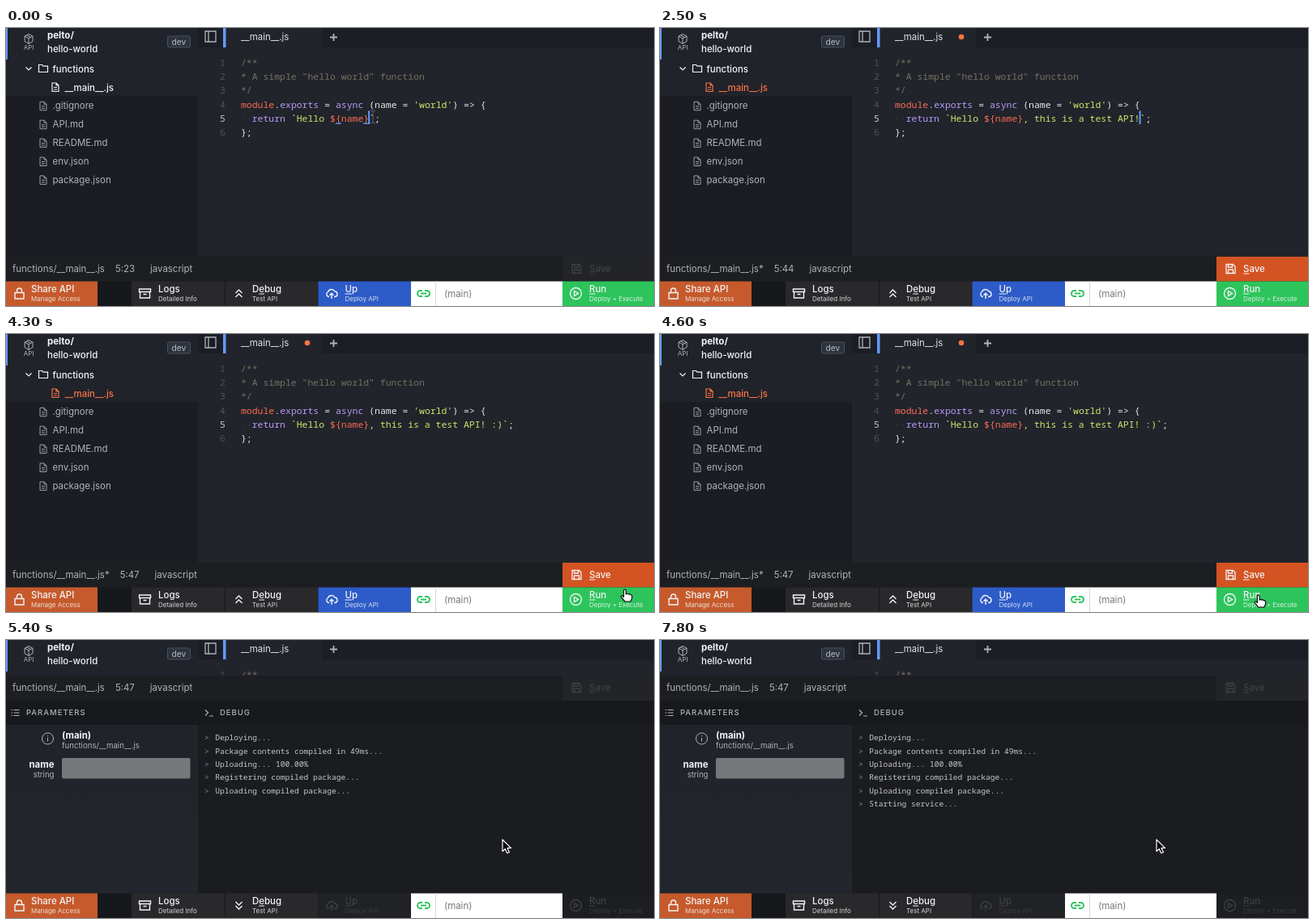
Write an HTML page with a canvas that moves like this. It is 800 px wide and 344 px high and loops after 8 s.

```html
<!DOCTYPE html>
<html lang="en">
<head>
<meta charset="utf-8">
<style>
  html, body { margin: 0; width: 100%; height: 100%; overflow: hidden; background: #1b1d22; }
  canvas { display: block; width: 800px; height: 344px; }
</style>
</head>
<body>
<canvas id="stage" width="800" height="344"></canvas>
<script>
const ctx = document.getElementById('stage').getContext('2d');
const LOOP = 8000, OPEN = 4700, LAST_KEY = 2800, MARK_FILE = 2200;
const UI = 'Inter, sans-serif', MONO = '"Noto Sans Mono", monospace';
const CODE_X = 290, CODE_SIZE = 11.46, ADVANCE = CODE_SIZE * 0.6, LINE = 17.15;
const FOOT = 313.5;
const ORANGE = '#fa7343', WHITE = '#f3f4f6', GREY = '#b0b3b9', BLUE = '#6699ff', OFF = '#3e4044';
const RED = '#ff6b55', PURPLE = '#b99af8', GREEN = '#cde86c', COMMENT = '#777162', PLAIN = '#e6e7ea';
const TYPED = ', this is a test API! :)';

const LOG = [
  [4700, 'Deploying...'],
  [4800, 'Package contents compiled in 49ms...'],
  [4950, 'Uploading... 100.00%'],
  [5100, 'Registering compiled package...'],
  [5400, 'Uploading compiled package...'],
  [6400, 'Starting service...'],
];

// time, x, y of the pointer tip
const POINTER = [[3800, 453, 110], [4250, 764, 316], [4400, 764, 316], [4650, 736, 324],
                 [4850, 736, 324], [5200, 613, 247]];

const ICON = {
  cube: 'M0-6L5-3.3V3L0 6L-5 3V-3.3ZM-5-3.3L0-.6L5-3.3M0-.6V6M-2.5-4.7L2.5-2',
  chevron: 'M-3.5-1.5L0 2L3.5-1.5',
  folder: 'M-5.5 4.5V-4.5H-1.5L0-2.8H5.5V4.5Z',
  file: 'M-4-5H1L4-2V5.5H-4ZM1-5V-2H4M-2 .5H2M-2 3H2',
  panel: 'M-6.5-6.5H6.5V6.5H-6.5ZM-2.5-6.5V6.5',
  lock: 'M-5.5-1H5.5V6.5H-5.5ZM-3-1V-3.5A3 3 0 0 1 3-3.5V-1',
  box: 'M-7-5.5H7V-2H-7ZM-6-2V5.5H6V-2M-2 1H2',
  up: 'M-4-.5L0-4.5L4-.5M-4 4.5L0 .5L4 4.5',
  down: 'M-4-4.5L0-.5L4-4.5M-4 .5L0 4.5L4 .5',
  cloud: 'M-3 4H-4A3.3 3.3 0 0 1-4.5-2A4.7 4.7 0 0 1 4-2.5A3.3 3.3 0 0 1 4.5 4H3M0 6.5V0M-2.5 2.3L0-.2L2.5 2.3',
  link: 'M-1.5-3.5H-4A3.5 3.5 0 0 0-4 3.5H-1.5M1.5-3.5H4A3.5 3.5 0 0 1 4 3.5H1.5M-3.5 0H3.5',
  save: 'M-5.5-5.5H3L5.5-3V5.5H-5.5ZM-3-5.5V-2H2V-5.5M-3 5.5V1H3V5.5',
  play: 'M-7 0A7 7 0 1 1 7 0A7 7 0 1 1-7 0M-2-3L3 0L-2 3Z',
  info: 'M-7 0A7 7 0 1 1 7 0A7 7 0 1 1-7 0M0-1V3.5M0-3.8V-2.6',
  list: 'M-5-3.5H-3.5M-2-3.5H5M-5 0H-3.5M-2 0H5M-5 3.5H-3.5M-2 3.5H5',
  prompt: 'M-5-3.5L-1.5 0L-5 3.5M0 4H5',
  plus: 'M-4.5 0H4.5M0-4.5V4.5',
};
const ARROW = 'M0 0V14.5L3.4 11.4L5.7 16.7L8.3 15.6L6 10.4H10.5Z';
const HAND = 'M-1.4 1Q0-1 1.4 1V6Q3 4.5 4.2 6Q5.6 5 6.7 6.7Q8.4 6 8.8 8V11L7 15H0L-4.5 9.5Q-5 7.3-2.8 8L-1.4 9.5Z';
const IBEAM = 'M-3-8Q0-8 0-6Q0-8 3-8M0-6V6M-3 8Q0 8 0 6Q0 8 3 8';

function rect(x, y, w, h, color) {
  ctx.fillStyle = color;
  ctx.fillRect(x, y, w, h);
}

// y is the middle of the capitals; returns the width
function text(str, x, y, color = WHITE, size = 11.45, weight = 400, family = UI) {
  ctx.font = `${weight} ${size}px ${family}`;
  ctx.fillStyle = color;
  ctx.fillText(str, x, y + size * 0.36);
  return ctx.measureText(str).width;
}

function icon(name, x, y, color = GREY, width = 1.2) {
  ctx.save();
  ctx.translate(x, y);
  ctx.strokeStyle = color;
  ctx.lineWidth = width;
  ctx.stroke(new Path2D(ICON[name]));
  ctx.restore();
}

function code(row, parts) {
  let col = 0;
  for (const [str, color] of parts) {
    text(str, CODE_X + col * ADVANCE, 43 + row * LINE, color, CODE_SIZE, 500, MONO);
    col += str.length;
  }
}

// Button label with one underlined access key
function label(str, key, x, y, color) {
  text(str, x, y, color, 11.45, 500);
  if (key < 0) return;
  const start = ctx.measureText(str.slice(0, key)).width;
  rect(x + start, y + 5.5, ctx.measureText(str[key]).width, 1, color);
}

function button(x, w, bg, glyph, title, key, sub, color = WHITE) {
  rect(x, FOOT, w, 31, bg);
  icon(glyph, x + 16.5, 328.5, color, 1.4);
  const left = x + (x ? 33 : 31);
  label(title, key, left, 323, color);
  ctx.globalAlpha = 0.85;
  text(sub, left, 335, color, 8);
  ctx.globalAlpha = 1;
}

function sidebar(t) {
  rect(0, 0, 237, 344, '#1b1d22');
  rect(0, 0, 237, 84, '#20232a');
  rect(0, 0, 2, 39, BLUE);
  icon('cube', 28, 13.5, GREY, 1);
  text('API', 21.8, 24, GREY, 8);
  text('pelto/', 51, 8.5, WHITE, 11.45, 700);
  text('hello-world', 51, 25.7, WHITE, 11.45, 500);
  ctx.beginPath();
  ctx.roundRect(199.5, 10, 28, 14, 2);
  ctx.fillStyle = '#2d333d';
  ctx.fill();
  ctx.strokeStyle = '#4a515d';
  ctx.lineWidth = 1;
  ctx.stroke();
  text('dev', 204.5, 17, '#b5bac3', 10.2);

  icon('chevron', 28, 50, WHITE);
  icon('folder', 46, 50, WHITE);
  text('functions', 57.5, 50.4, WHITE, 11.45, 500);
  const mainColor = t >= MARK_FILE ? ORANGE : WHITE;
  icon('file', 61, 73, mainColor);
  text('__main__.js', 72.5, 73.4, mainColor, 11.45, 500);
  ['.gitignore', 'API.md', 'README.md', 'env.json', 'package.json'].forEach((name, i) => {
    const y = 96.3 + i * 22.9;
    icon('file', 46, y, '#9b9ea5', 1);
    text(name, 57.5, y, GREY);
  });
}

function editor(t, typed, dirty) {
  rect(237, 0, 563, 283, '#21242b');
  rect(237, 0, 563, 24, '#1b1e24');
  rect(268, 0, 122, 24, '#21242b');
  rect(268, 0, 3.5, 24, BLUE);
  icon('panel', 252.5, 10.5, GREY, 1.3);
  text('__main__.js', 290, 10.6, '#e2e4e8');
  icon('plus', 404.5, 11.5, GREY, 1.8);
  if (dirty) {
    ctx.beginPath();
    ctx.arc(372, 11, 3.3, 0, 7);
    ctx.fillStyle = ORANGE;
    ctx.fill();
  }
  for (let i = 0; i < 6; i++)
    text(i + 1, 264, 43 + i * LINE, i === 4 ? '#c9ccd2' : '#4d525c', CODE_SIZE, 400, MONO);

  code(0, [['/**', COMMENT]]);
  code(1, [['* A simple "hello world" function', COMMENT]]);
  code(2, [['*/', COMMENT]]);
  code(3, [['module', RED], ['.', PLAIN], ['exports', PURPLE], [' = ', PLAIN], ['async', PURPLE],
           [' (name = ', PLAIN], ["'world'", GREEN], [') => {', PLAIN]]);
  code(4, [['··', '#3d414a'], ['return', PURPLE], [' `Hello ', GREEN], ['${name}', RED],
           [TYPED.slice(0, typed) + '`', GREEN], [';', PLAIN]]);
  code(5, [['};', PLAIN]]);

  if (!typed)
    for (const col of [17, 22]) rect(CODE_X + col * ADVANCE, 117.5, ADVANCE, 1.3, BLUE);
  if (t < LAST_KEY || (t - LAST_KEY) % 1000 < 500)
    rect(CODE_X + (23 + typed) * ADVANCE - 1, 102.5, 2, 16.5, BLUE);
}

function statusBar(y, typed, dirty) {
  rect(0, y, 800, 31, '#1c1e22');
  let x = 8;
  x += text('functions/__main__.js' + (dirty ? '*' : ''), x, y + 15, GREY) + 13;
  x += text('5:' + (23 + typed), x, y + 15, GREY) + 19;
  text('javascript', x, y + 15, GREY);
  rect(687, y, 113, 31, dirty ? '#d45322' : '#232428');
  icon('save', 704.5, y + 15, dirty ? WHITE : OFF, 1.3);
  label('Save', 0, 720, y + 15, dirty ? WHITE : OFF);
}

function debugPanel(t) {
  const side = ctx.createLinearGradient(0, 105, 0, 313);
  side.addColorStop(0, '#20242a');
  side.addColorStop(1, '#23262d');
  rect(0, 75, 237, 239, side);
  rect(237, 75, 563, 239, '#1b1c20');
  rect(0, 75, 800, 30, '#18191d');
  ctx.letterSpacing = '1px';
  text('PARAMETERS', 25, 90, GREY, 9.5, 500);
  text('DEBUG', 264, 90, GREY, 9.5, 500);
  ctx.letterSpacing = '0px';
  icon('list', 11.5, 90);
  icon('prompt', 251, 90);

  icon('info', 51.5, 122, GREY, 1);
  text('(main)', 69, 117.5, WHITE, 11.45, 700);
  text('functions/__main__.js', 69, 130.5, GREY, 9.65);
  ctx.textAlign = 'right';
  text('name', 59.5, 154, WHITE, 11.45, 700);
  text('string', 59.5, 167, GREY, 9.65);
  ctx.textAlign = 'left';
  ctx.beginPath();
  ctx.roundRect(69, 146, 158.5, 25.5, 2);
  ctx.fillStyle = '#767779';
  ctx.fill();

  LOG.forEach(([start, line], i) => {
    if (t < start) return;
    const y = 121 + i * 16.3;
    text('>', 245, y, '#85888e', 9.58, 400, MONO);
    text(line, 258.3, y, '#c6c8cc', 9.58, 400, MONO);
  });
}

function footer(open) {
  rect(0, FOOT, 800, 31, '#17181c');
  button(0, 113, '#c65a2c', 'lock', 'Share API', -1, 'Manage Access');
  button(155, 115, '#29292b', 'box', 'Logs', -1, 'Detailed Info');
  button(271, 114, '#29292b', open ? 'down' : 'up', 'Debug', 1, 'Test API');
  button(385.5, 114.5, open ? '#212226' : '#2d5bc8', 'cloud', 'Up', 0, 'Deploy API', open ? OFF : WHITE);
  rect(500, FOOT, 187, 31, '#ffffff');
  rect(530, FOOT, 1, 31, '#d9d9d9');
  icon('link', 515.5, 328.5, '#2dc45c', 1.9);
  text('(main)', 541, 329, '#777777');
  button(687, 113, open ? '#1d1e22' : '#2dc45c', 'play', 'Run', 0, 'Deploy + Execute', open ? OFF : WHITE);
}

function pointerAt(t) {
  const i = POINTER.findIndex(p => p[0] > t);
  if (i === 0) return POINTER[0].slice(1);
  if (i < 0) return POINTER.at(-1).slice(1);
  const [t0, x0, y0] = POINTER[i - 1], [t1, x1, y1] = POINTER[i];
  const u = (t - t0) / (t1 - t0), ease = u * u * (3 - 2 * u);
  return [x0 + (x1 - x0) * ease, y0 + (y1 - y0) * ease];
}

function pointer(t, open) {
  if (t >= 100 && t < POINTER[0][0]) return;
  const [x, y] = pointerAt(t);
  ctx.save();
  ctx.translate(x, y);
  ctx.lineJoin = 'round';
  if (!open && y < 283) {
    ctx.strokeStyle = '#5c6068';
    ctx.lineWidth = 1;
    ctx.stroke(new Path2D(IBEAM));
  } else {
    const hand = !open && x > 687;
    const shape = new Path2D(hand ? HAND : ARROW);
    ctx.fillStyle = hand ? '#ffffff' : '#000000';
    ctx.strokeStyle = hand ? '#111111' : '#ffffff';
    ctx.lineWidth = 1.2;
    ctx.fill(shape);
    ctx.stroke(shape);
  }
  ctx.restore();
}

function draw(now) {
  const t = now % LOOP, open = t >= OPEN;
  const typed = Math.min(TYPED.length, Math.floor((t + 15) / 115));
  const dirty = typed > 0 && !open;
  sidebar(t);
  editor(t, typed, dirty);
  if (open) debugPanel(t);
  statusBar(open ? 44 : 283, typed, dirty);
  footer(open);
  pointer(t, open);
  requestAnimationFrame(draw);
}
requestAnimationFrame(draw);
</script>
</body>
</html>
```
